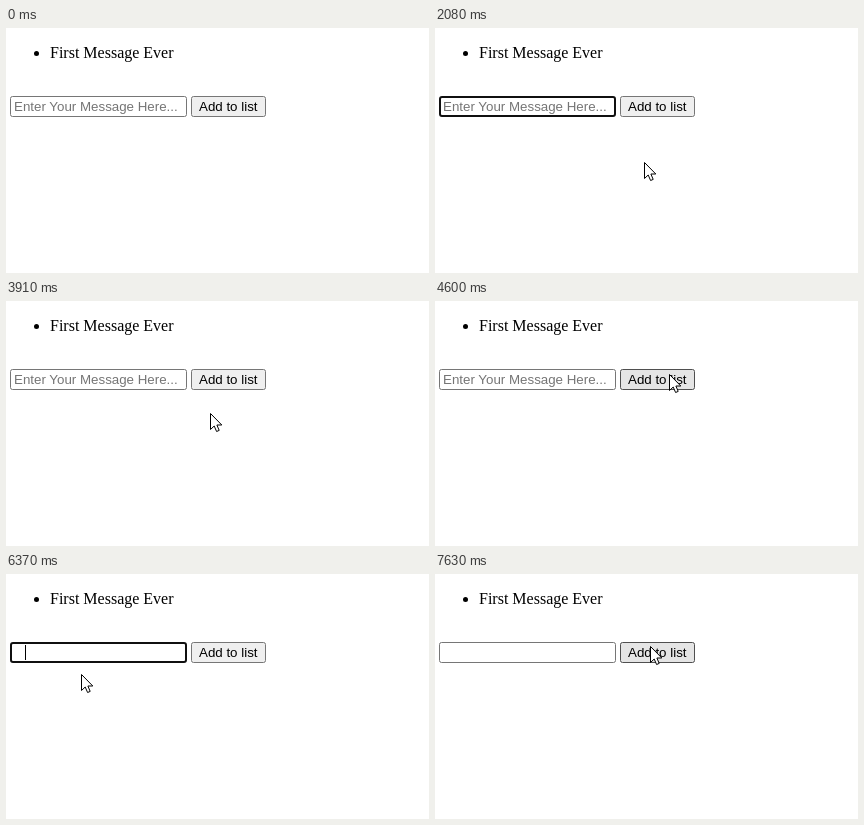
Animation, 423 px wide and 245 px high, one loop 8000 ms. Source, as an HTML page:

```html
<!DOCTYPE html>
<html lang="en">
<head>
<meta charset="utf-8">
<title>Message list</title>
<style>
html, body { margin: 0; width: 100%; height: 100%; overflow: hidden; background: #fff; }
svg { display: block; width: 100%; height: 100%; }
.serif { font: 16px "Liberation Serif", "Times New Roman", serif; }
.sans { font: 13.333px "Liberation Sans", Arial, sans-serif; }
</style>
</head>
<body>
<svg viewBox="0 0 423 245">
  <circle cx="30.5" cy="25.5" r="2.5"/>
  <text class="serif" x="44" y="30">First Message Ever</text>
  <rect id="field" fill="#fff" rx="2"/>
  <text id="hint" class="sans" x="8" y="83" fill="#757575">Enter Your Message Here...</text>
  <rect id="caret" y="71" width="1" height="15"/>
  <rect id="button" x="185.5" y="68.5" width="74" height="20" rx="2"/>
  <text class="sans" x="193" y="83">Add to list</text>
  <path id="arrow" d="M.5 .5V16.5L4.2 13L6.6 18.5L9.2 17.4L6.9 12H11.8Z" fill="#fff" stroke="#000" stroke-linejoin="round"/>
  <path id="beam" d="M-3 -8.5H-1L0 -7.5L1 -8.5H3M0 -7.5V7.5M-3 8.5H-1L0 7.5L1 8.5H3" fill="none" stroke="#000"/>
</svg>
<script>
const LOOP = 8000;
const STEP = 133;   // ms between pictures
const LEAD = 313;   // ms before the first step
const REST = 2;     // steps spent on a control, with the click halfway
const BLINK = 4;    // steps of caret on or off
const TYPING = { from: 41, count: 3 };

const el = id => document.getElementById(id);
const [field, hint, caret, button, arrow, beam] =
  ['field', 'hint', 'caret', 'button', 'arrow', 'beam'].map(el);

// Pointer stops, arrival counted in steps
const stops = [
  [0, 293, 22], [5, 150, 74], [7, 150, 74], [13, 209, 134], [15, 218, 76],
  [19, 208, 113], [21, 223, 72], [27, 204, 112], [30, 234, 73], [34, 224, 116],
  [36, 236, 73], [39, 90, 72], [45, 75, 100], [48, 78, 146], [53, 215, 72]
].map(([at, x, y]) => ({ at, x, y, on: control(x, y) }));

const clicks = stops.filter(s => s.on).map(s => ({ at: s.at + REST / 2, on: s.on }));

function control(x, y) {
  if (y < 68 || y >= 89) return null;
  if (x >= 4 && x < 181) return field;
  return x >= 185 && x < 260 ? button : null;
}

const show = (node, on) => node.setAttribute('visibility', on ? 'visible' : 'hidden');
const set = (node, attrs) => {
  for (const name in attrs) node.setAttribute(name, attrs[name]);
};
const clamp = (v, lo, hi) => Math.min(hi, Math.max(lo, v));
const ease = u => u * u * (3 - 2 * u);

function pointer(n) {
  const i = stops.findLastIndex(s => s.at <= n);
  const a = stops[Math.max(i, 0)];
  const b = stops[i + 1] || a;
  const leave = Math.min(a.at + (a.on ? REST : 0), b.at);
  const k = ease(clamp((n - leave) / (b.at - leave || 1), 0, 1));
  return [a.x + (b.x - a.x) * k, a.y + (b.y - a.y) * k].map(Math.round);
}

function drawField(n, click) {
  const focus = click && click.on === field;
  set(field, focus
    ? { x: 5, y: 69, width: 175, height: 19, stroke: '#101010', 'stroke-width': 2 }
    : { x: 4.5, y: 68.5, width: 176, height: 20, stroke: '#767676', 'stroke-width': 1 });

  const typed = clamp(n - TYPING.from + 1, 0, TYPING.count);
  const touched = typed ? TYPING.from + typed - 1 : focus ? click.at : 0;
  show(hint, !typed);
  show(caret, focus && Math.floor((n - touched) / BLINK) % 2 === 0);
  set(caret, { x: Math.round(8 + typed * 3.7) });
}

function drawButton(over, pressed) {
  const [fill, stroke] = !over ? ['#efefef', '#767676']
    : pressed ? ['#f5f5f5', '#8d8d8d'] : ['#e5e5e5', '#4f4f4f'];
  set(button, { fill, stroke });
}

function draw(time) {
  const n = Math.floor((time - LEAD) / STEP);
  const [x, y] = pointer(n);
  const over = n > 0 ? control(x, y) : null;
  const click = clicks.findLast(c => c.at <= n);

  drawField(n, click);
  drawButton(over === button, click && click.at === n);

  show(arrow, n > 0 && over !== field);
  show(beam, over === field);
  set(arrow, { transform: `translate(${x} ${y})` });
  set(beam, { transform: `translate(${x + 0.5} ${y})` });
}

const start = performance.now();
function tick() {
  draw((performance.now() - start) % LOOP);
  requestAnimationFrame(tick);
}
tick();
</script>
</body>
</html>
```
